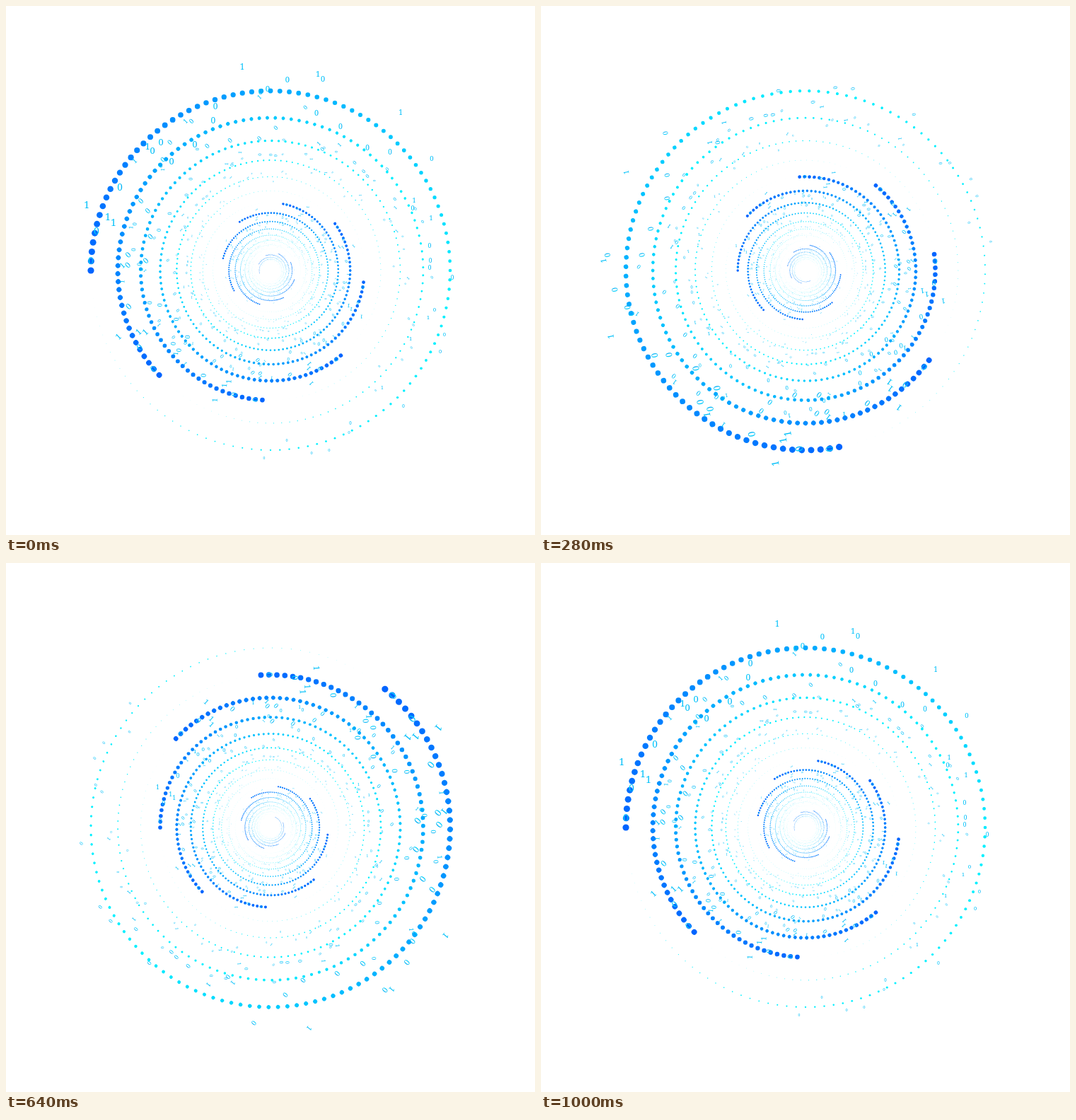
An HTML page with a canvas for the animation above (1040 ms loop, 748 by 748 pixels).

```html
<!DOCTYPE html>
<html>
<head>
<meta charset="utf-8">
<style>
html, body { margin: 0; width: 100%; height: 100%; overflow: hidden; background: #fff; }
canvas { display: block; width: 748px; height: 748px; }
</style>
</head>
<body>
<canvas id="stage" width="748" height="748"></canvas>
<script>
const ctx = document.getElementById('stage').getContext('2d');
const RAD = Math.PI / 180;
const CENTER = 374, RADIUS = 254, RINGS = 18, DOTS = 120;
const RING_SCALE = 0.85, RING_TURN = -43.2;
const STEP_MS = 40, STEPS = 26, STEP_TURN = -14.4;

// Stage positions of the digits around the outermost ring, as x, y pairs
const ones = [
  114,281, 144,298, 152,306, 200,199, 334,86, 441,96, 558,151,
  577,275, 601,300, 597,440, 572,470, 532,540
];
const zeros = [
  120,360, 128,318, 161,256, 207,205, 219,193, 234,220, 267,196, 293,162,
  296,142, 360,121, 370,117, 398,104, 448,103, 439,151, 473,170, 511,201,
  543,207, 602,216, 575,286, 599,339, 600,360, 599,370, 631,384, 606,429,
  620,464, 614,488, 562,566, 487,590, 485,603, 457,628, 432,632, 397,614,
  365,639
];

const digits = [];
function addDigits(text, points) {
  for (let i = 0; i < points.length; i += 2) {
    const x = points[i] - CENTER, y = points[i + 1] - CENTER;
    // Share of the way from head to tail
    const along = (Math.atan2(y, x) / RAD + 180) % 360 / 360;
    digits.push({ text, x, y, size: 1 - 0.85 * along });
  }
}
addDigits('1', ones);
addDigits('0', zeros);

const ink = ctx.createLinearGradient(-5, 0, 5, 0);
ink.addColorStop(0, '#00d8ff');
ink.addColorStop(1, '#00a8f4');

function drawDots() {
  for (let k = DOTS - 1; k >= 0; k--) {
    const angle = (180 + k * 360 / DOTS) * RAD;
    const green = 100 + 140 * Math.min(1, k / 62);
    ctx.fillStyle = `rgb(0, ${Math.round(green)}, 255)`;
    ctx.beginPath();
    ctx.arc(RADIUS * Math.cos(angle), RADIUS * Math.sin(angle),
      4.6 * (1 - k / DOTS), 0, 2 * Math.PI);
    ctx.fill();
  }
}

function drawDigits() {
  ctx.fillStyle = ink;
  for (const d of digits) {
    ctx.save();
    ctx.translate(d.x, d.y);
    ctx.scale(d.size, d.size);
    ctx.fillText(d.text, 0, 5);
    ctx.restore();
  }
}

function draw(turn) {
  ctx.setTransform(1, 0, 0, 1, 0, 0);
  ctx.fillStyle = '#fff';
  ctx.fillRect(0, 0, 748, 748);
  ctx.font = '14.5px "Noto Serif", serif';
  ctx.textAlign = 'center';
  ctx.translate(CENTER, CENTER);
  ctx.rotate(turn * RAD);
  for (let i = 0; i < RINGS; i++) {
    drawDots();
    drawDigits();
    ctx.scale(RING_SCALE, RING_SCALE);
    ctx.rotate(RING_TURN * RAD);
  }
}

let shown = -1;
function tick() {
  const step = Math.floor(performance.now() / STEP_MS) % STEPS;
  if (step !== shown) draw(step * STEP_TURN);
  shown = step;
  requestAnimationFrame(tick);
}
tick();
</script>
</body>
</html>
```
